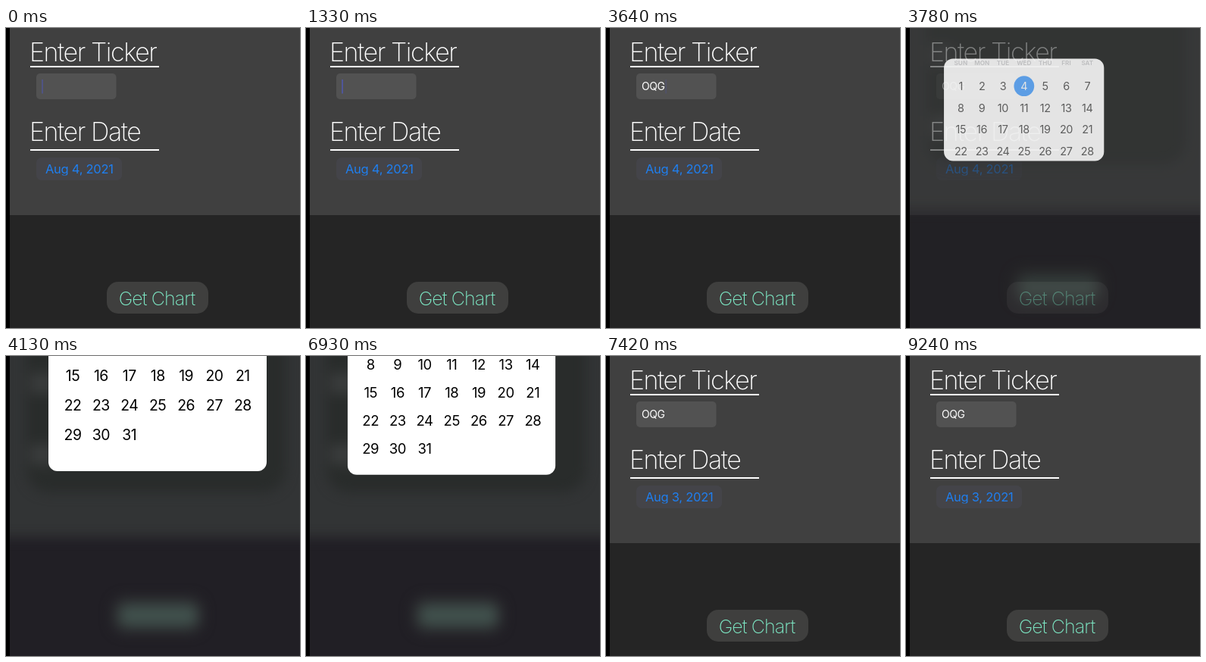
An HTML page that plays this animation: 388 px wide and 396 px high, repeating every 9450 ms.

```html
<!DOCTYPE html>
<html lang="en">
<head>
<meta charset="utf-8">
<title>Ticker form</title>
<style>
  html, body { margin: 0; width: 100%; height: 100%; overflow: hidden; background: #000; }
  svg { display: block; font-family: Inter, "Liberation Sans", sans-serif; }
  .title { font-size: 34px; font-weight: 200; letter-spacing: -1.45px; fill: #fff; }
  .day { font-size: 19.4px; letter-spacing: -.5px; text-anchor: middle; }
  .weekday { font-size: 11px; font-weight: 600; fill: #b4b4b8; text-anchor: middle; }
</style>
</head>
<body>
<svg width="388" height="396" viewBox="0 0 388 396">
  <defs>
    <clipPath id="screen"><rect x="5" width="383" height="396"/></clipPath>
    <clipPath id="boxClip"><rect id="clipRect" rx="12"/></clipPath>
    <clipPath id="dateClip"><rect x="40" y="171" width="113" height="23.5"/></clipPath>
    <filter id="soft" x="-50%" y="-100%" width="200%" height="300%" color-interpolation-filters="sRGB">
      <feGaussianBlur stdDeviation="8"/>
    </filter>
  </defs>
  <g clip-path="url(#screen)">
    <rect width="388" height="247" fill="#404040"/>
    <rect y="247" width="388" height="149" fill="#252525"/>

    <text class="title" x="31" y="43.7">Enter Ticker</text>
    <rect x="32" y="50" width="170" height="2" fill="#fff"/>
    <rect x="40" y="60" width="105.5" height="34" rx="5" fill="#525252"/>
    <text id="ticker" x="47" y="82" font-size="14" letter-spacing="-.4" fill="#fff"></text>
    <rect id="caret" y="68" width="2" height="18.5" fill="#4c5be0"/>

    <text class="title" x="31" y="149">Enter Date</text>
    <rect x="32" y="160" width="170" height="2" fill="#fff"/>
    <rect x="40" y="171" width="113" height="30" rx="7" fill="#444449"/>
    <text id="date" x="52" y="192" font-size="16.5" letter-spacing="-.27" fill="#1f7ff0" clip-path="url(#dateClip)"></text>

    <g id="button">
      <rect x="133" y="335" width="134" height="42" rx="15" fill="#3f3f3e"/>
      <text x="199" y="366" font-size="25" font-weight="200" letter-spacing="-.9" text-anchor="middle" fill="#7eeac6">Get Chart</text>
    </g>

    <g id="blurred">
      <rect width="388" height="396" fill="#211f25"/>
      <g filter="url(#soft)">
        <rect x="-40" y="-60" width="468" height="299" fill="#323435"/>
      </g>
      <g filter="url(#soft)">
        <rect x="27" y="-60" width="342" height="240" rx="30" fill="#292c2b"/>
        <rect x="32" y="22" width="30" height="28" fill="#3a3c3c"/>
        <rect x="32" y="116" width="30" height="28" fill="#3a3c3c"/>
        <rect x="140" y="318" width="120" height="48" rx="18" fill="#2e3032"/>
        <rect x="150" y="329" width="102" height="27" rx="12" fill="#40504c"/>
      </g>
    </g>

    <g id="popup">
      <rect id="box" rx="12" fill="#fff"/>
      <g clip-path="url(#boxClip)"><g id="calendar"></g></g>
    </g>
  </g>
</svg>
<script>
const $ = id => document.getElementById(id);
const set = (id, attrs) => {
  for (const key in attrs) $(id).setAttribute(key, attrs[key]);
};
const clamp = v => Math.min(1, Math.max(0, v));
const mix = (a, b, p) => a + (b - a) * p;
const spring = x => x <= 0 ? 0 : 1 - (1 + x) * Math.exp(-x);

const LOOP = 9450, STEP = 70;
const TICKER = "OQG", KEY_TIMES = [1400, 1680, 1960];
const OPEN = { x: 200, y: -9, w: 288, h: 322 };
const CLOSED = { x: 103, y: 186, w: 120, h: 10 };

const columnX = c => 88 + c * 37.4;
const rowY = r => -51 + r * 38.7;

function buildCalendar() {
  let html = `<text x="74" y="-128" font-size="16" font-weight="600">August 2021</text>
    <circle id="selected" cy="${rowY(0)}" r="18" fill="#007aff"/>`;
  ["SUN", "MON", "TUE", "WED", "THU", "FRI", "SAT"].forEach((name, c) => {
    html += `<text class="weekday" x="${columnX(c)}" y="-88">${name}</text>`;
  });
  for (let d = 0; d < 31; d++) {
    html += `<text class="day" id="day${d + 1}" x="${columnX(d % 7)}" y="${rowY(Math.floor(d / 7)) + 7}">${d + 1}</text>`;
  }
  $("calendar").innerHTML = html;
}

// Each pair is [time, opacity], joined by straight ramps.
function ramp(t, points) {
  for (let i = 1; i < points.length; i++) {
    const [t0, v0] = points[i - 1], [t1, v1] = points[i];
    if (t < t1) return mix(v0, v1, clamp((t - t0) / (t1 - t0)));
  }
  return points[points.length - 1][1];
}

const caretOpacity = t => ramp(t, [
  [0, .35], [140, 1], [210, 1], [420, 0], [1260, 0], [1400, 1], [2380, 1], [2590, 0],
  [2800, 0], [3010, 1], [3360, 1], [3640, .15], [3710, 0]
]);

const buttonOpacity = t => ramp(t, [
  [8750, 1], [8820, .97], [8890, .97], [8960, .6], [9030, .3], [9100, .45], [9170, .75], [9240, 1]
]);

// 0 = popup fully open, 1 = collapsed into the date pill.
function collapse(t) {
  if (t <= 3640 || t >= 7420) return 1;
  if (t < 4130) return 1 - spring((t - 3640) * .013);
  return spring((t - 6885) * .0105);
}

function drawPopup(p) {
  const py = 1 - (1 - p) ** 1.5;
  const x = mix(OPEN.x, CLOSED.x, p), y = mix(OPEN.y, CLOSED.y, py);
  const w = mix(OPEN.w, CLOSED.w, p), h = mix(OPEN.h, CLOSED.h, py);
  const rect = { x: x - w / 2, y: y - h / 2, width: w, height: h };
  set("box", rect);
  set("clipRect", rect);
  set("calendar", {
    transform: `translate(${x} ${y}) scale(${1 - .56 * p}) translate(${-OPEN.x} ${-OPEN.y})`,
    opacity: clamp(1.25 - 1.4 * p)
  });
  set("popup", { opacity: clamp((1 - p) * 1.6) });
  set("blurred", { opacity: clamp((1 - p) * 1.1) });
}

function render(t) {
  const typed = KEY_TIMES.filter(k => t >= k).length;
  const day = t < 5500 ? 4 : 3;
  $("ticker").textContent = TICKER.slice(0, typed);
  set("caret", { x: 47 + typed * 10.4, opacity: caretOpacity(t) });
  $("date").textContent = `Aug ${day}, 2021`;
  set("selected", { cx: columnX(day - 1) });
  for (const d of [3, 4]) set("day" + d, { fill: d === day ? "#fff" : "#000" });
  set("button", { opacity: buttonOpacity(t) });
  drawPopup(collapse(t));
}

function frame() {
  const t = performance.now() % LOOP;
  render(Math.floor(t / STEP) * STEP);
  requestAnimationFrame(frame);
}

buildCalendar();
frame();
</script>
</body>
</html>
```
